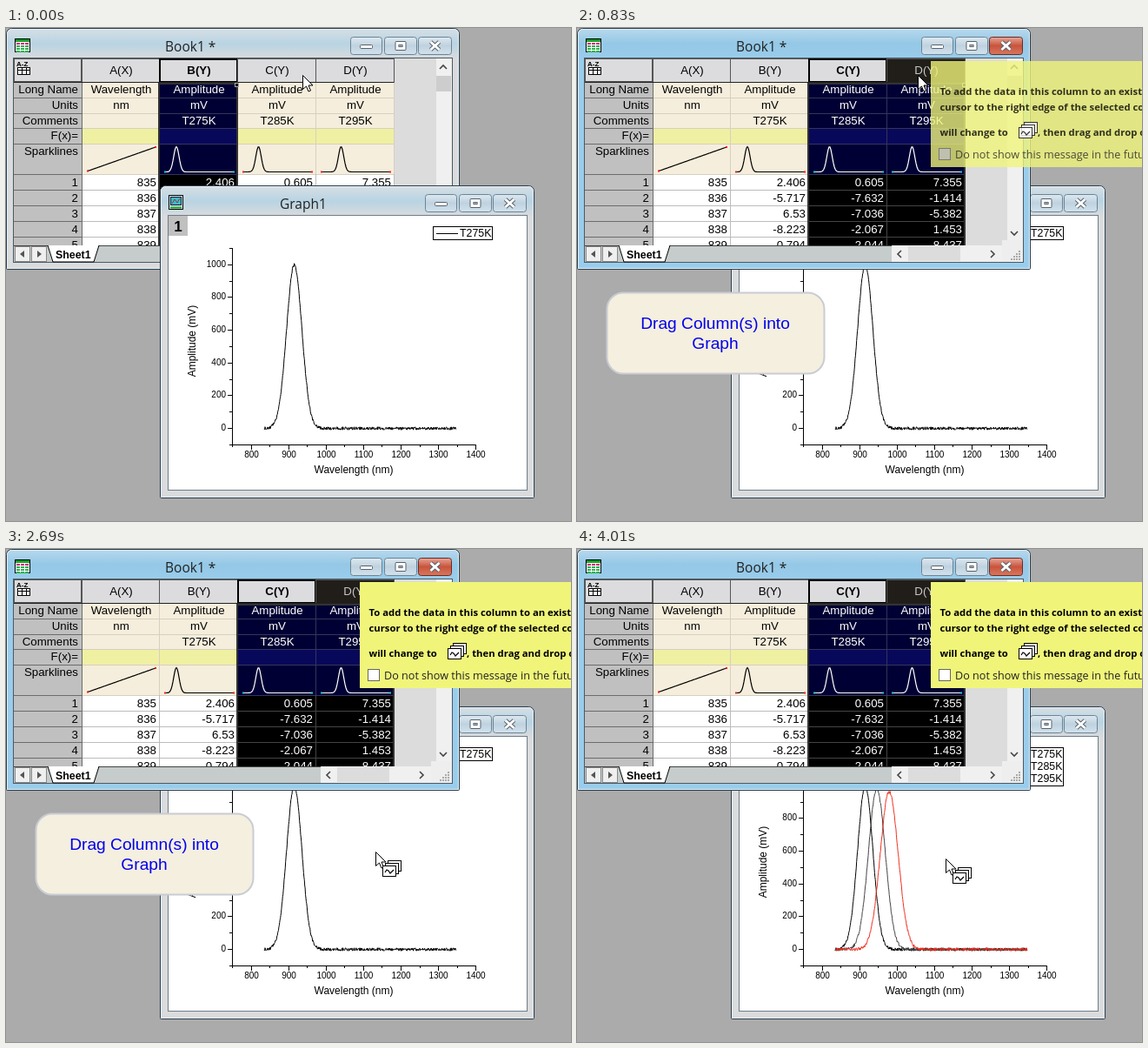
Write an HTML page with a canvas that moves like this. It is 650 by 567 pixels and loops after 4110 ms.

```html
<!DOCTYPE html>
<html lang="en">
<head>
<meta charset="utf-8">
<title>Drag columns into a graph</title>
<style>
html, body { margin: 0; width: 100%; height: 100%; overflow: hidden; background: #ababab; }
canvas { display: block; }
</style>
</head>
<body>
<canvas id="stage" width="650" height="567"></canvas>
<script>
const c = document.getElementById('stage').getContext('2d');
const LOOP = 4110;
const ARIAL = '"Liberation Sans", Arial, sans-serif';
const UI = '"Open Sans", "Noto Sans", sans-serif';

const colX = [87, 176, 266, 356, 446];
const rowY = [62, 80, 98, 115, 133, 168, 186, 204, 222, 240, 258];
const rowNames = ['Long Name', 'Units', 'Comments', 'F(x)=', 'Sparklines', 1, 2, 3, 4, 5];
const columns = [
  { head: 'A(X)', labels: ['Wavelength', 'nm', ''], data: [835, 836, 837, 838, 839] },
  { head: 'B(Y)', labels: ['Amplitude', 'mV', 'T275K'], data: [2.406, -5.717, 6.53, -8.223, 0.794], peak: 196 },
  { head: 'C(Y)', labels: ['Amplitude', 'mV', 'T285K'], data: [0.605, -7.632, -7.036, -2.067, -2.044], peak: 290.5 },
  { head: 'D(Y)', labels: ['Amplitude', 'mV', 'T295K'], data: [7.355, -1.414, -5.382, 1.453, 8.437], peak: 385.5 },
];
const series = [
  { name: 'T275K', color: '#000', center: 915, height: 998, sigma: 20.5 },
  { name: 'T285K', color: '#444', center: 946, height: 980, sigma: 22.5 },
  { name: 'T295K', color: '#f03020', center: 979, height: 962, sigma: 24 },
];

const clamp = v => Math.max(0, Math.min(1, v));
const plotX = nm => 260.5 + (nm - 750) * 0.431;
const plotY = mv => 460.5 - mv * 0.1883;

function rect(x, y, w, h, fill, stroke) {
  if (fill) { c.fillStyle = fill; c.fillRect(x, y, w, h); }
  if (stroke) { c.strokeStyle = stroke; c.lineWidth = 1; c.strokeRect(x + .5, y + .5, w - 1, h - 1); }
}

function round(x, y, w, h, r, fill, stroke, width = 1) {
  c.beginPath();
  c.roundRect(x, y, w, h, r);
  c.fillStyle = fill;
  c.fill();
  c.strokeStyle = stroke;
  c.lineWidth = width;
  c.stroke();
}

function line(points, color, width = 1) {
  c.beginPath();
  points.forEach(([x, y]) => c.lineTo(x, y));
  c.strokeStyle = color;
  c.lineWidth = width;
  c.stroke();
}

function text(s, x, y, font, color = '#000', align = 'left') {
  c.font = font;
  c.fillStyle = color;
  c.textAlign = align;
  c.fillText(s, x, y);
}

function clipped(x, y, w, h, draw) {
  c.save();
  c.beginPath();
  c.rect(x, y, w, h);
  c.clip();
  draw();
  c.restore();
}

function makeCurve({ center, height, sigma }, seed) {
  const random = () => (seed = seed * 16807 % 2147483647) / 2147483647;
  const path = new Path2D();
  for (let nm = 835; nm <= 1347; nm++) {
    const mv = height * Math.exp(-(((nm - center) / sigma) ** 2) / 2) + (random() - .5) * 19;
    path.lineTo(plotX(nm), plotY(mv));
  }
  return path;
}
series.forEach((s, i) => s.path = makeCurve(s, 4321 + i * 977));

function frame(x, y, w, h, title, titleX, active) {
  const fill = c.createLinearGradient(0, y, 0, y + 36);
  const stops = active ? ['#b9d9ed', '#94c8e6', '#9acdec'] : ['#d8dfe4', '#b8d4e3', '#dadbdc'];
  stops.forEach((color, i) => fill.addColorStop(i / 2, color));
  round(x + .5, y + .5, w - 1, h - 1, [6, 6, 1, 1], fill, '#2c3d49');
  round(x + 1.5, y + 1.5, w - 3, h - 3, [5, 5, 0, 0], 'transparent', '#e4f0f8');
  text(title, titleX, y + 27, '15.5px ' + UI, '#222');

  const right = x + w;
  [[-126, 37], [-87, 38], [-48, 39]].forEach(([dx, bw], i) => {
    const bx = right + dx, by = y + 10, red = active && i === 2;
    const face = c.createLinearGradient(0, by, 0, by + 21);
    face.addColorStop(0, red ? '#e7aa9c' : '#dfeaf2');
    face.addColorStop(.5, red ? '#c9543c' : '#bfd2df');
    face.addColorStop(1, red ? '#d97a60' : '#d3e3ee');
    round(bx + .5, by + .5, bw - 1, 20, 3, face, red ? '#6b2a20' : '#6d8494');
    const mx = bx + bw / 2, my = by + 10.5;
    if (i === 0) round(mx - 7, my - 1, 14, 4, 1, '#fff', '#56616b');
    if (i === 1) {
      round(mx - 6, my - 5, 12, 10, 1, '#fff', '#56616b');
      rect(mx - 2.5, my - 1.5, 5, 3, '#a9bdcb', '#56616b');
    }
    if (i === 2) [['#56616b', 5], ['#fff', 3]].forEach(([color, width]) => {
      line([[mx - 5, my - 4.5], [mx + 5, my + 4.5]], color, width);
      line([[mx + 5, my - 4.5], [mx - 5, my + 4.5]], color, width);
    });
  });
}

function sparkline(i, selected) {
  const left = colX[i] + 7, right = colX[i + 1] - 4, { peak } = columns[i];
  const points = [];
  for (let x = left; x <= right; x++)
    points.push([x, peak ? 165.5 - 29 * Math.exp(-(((x - peak) / 3.1) ** 2) / 2)
                         : 164.5 - 27.5 * (x - left) / (right - left)]);
  line(points, selected ? '#fff' : '#000', 1.2);
  const end = points[points.length - 1];
  rect(left - 1, points[0][1] - 1, 2, 2, selected ? '#2cc' : '#e22');
  rect(end[0] - 1, end[1] - 1, 2, 2, selected ? '#2cc' : '#e22');
}

function cells(t) {
  const font = '13.3px ' + ARIAL;
  const lead = t < 30 ? 1 : 2;
  const last = t >= 30 && tipAt(t)[0] >= colX[3] ? 3 : lead;

  rect(9, 35, 78, 27, '#dcdcde', '#555');
  text('A-Z', 12, 44, 'bold 8px ' + ARIAL);
  rect(13, 45, 15, 9, '#fff', '#000');
  line([[13, 48.5], [28, 48.5]], '#000');
  line([[18.5, 45], [18.5, 54]], '#000');
  line([[23.5, 45], [23.5, 54]], '#000');

  rowNames.forEach((name, r) => {
    const y = rowY[r], h = rowY[r + 1] - y;
    rect(9, y + 1, 79, h, '#c0c0c0');
    line([[9, y + h + .5], [87.5, y + h + .5], [87.5, y]], '#6c6c6c');
    text(name, 83, y + (r > 4 ? 14 : 13), font, '#000', 'right');
  });

  columns.forEach((col, i) => {
    const x = colX[i], w = colX[i + 1] - x, middle = x + w / 2 + 1;
    const selected = i >= lead && i <= last, ink = selected ? '#fff' : '#000';
    rowNames.forEach((name, r) => {
      const y = rowY[r], h = rowY[r + 1] - y;
      const fill = r > 4 ? (selected ? '#000' : '#fff')
        : r === 3 ? (selected ? '#08085a' : '#f0f0a2')
        : selected ? '#000034' : '#f6eedc';
      rect(x + 1, y + 1, w, h, fill);
      const grid = selected ? (r > 4 ? '#444' : '#34345c') : (r > 4 ? '#bcbcbc' : '#d6d0c2');
      line([[x + 1, y + h + .5], [x + w + .5, y + h + .5], [x + w + .5, y]], grid);
      if (r < 3) text(col.labels[r], middle, y + 13, font, ink, 'center');
      if (r > 4) text(col.data[r - 5], x + w - 3, y + 14, font, ink, 'right');
    });
    sparkline(i, selected);

    const dark = selected && i !== lead;
    rect(x, 35, w + 1, 28, dark ? '#211e19' : '#dcdcde', '#555');
    if (selected && !dark) {
      c.strokeStyle = '#000';
      c.lineWidth = 2;
      c.strokeRect(x + 1, 36, w - 1, 26);
    }
    text(col.head, middle, 53, (selected && !dark ? 'bold ' : '') + font, dark ? '#c8c8c8' : '#000', 'center');
  });

  line([[9, 62.5], [446, 62.5]], '#222');
  const end = colX[last + 1];
  line([[colX[lead], 250], [colX[lead], 64], [end, 64], [end, 250]], '#333', 2);
  rect(end - 3, 63, 5, 5, '#000', '#aaa');
}

function chevron(x, y, dx, dy) {
  line([[x - dx * 2 - dy * 4, y - dy * 2 - dx * 4], [x + dx * 2, y + dy * 2],
        [x - dx * 2 + dy * 4, y - dy * 2 + dx * 4]], '#444', 1.6);
}

function book(t) {
  frame(0, 0, 522, 278, 'Book1 *', 183, t >= 30);
  rect(10, 12, 18, 16, '#fff', '#000');
  rect(11, 13, 16, 3, '#18a028');
  for (let y = 17; y < 27; y += 3) rect(12, y, 14, 2, y < 19 ? '#d02080' : '#30b050');
  line([[16.5, 16], [16.5, 27]], '#fff');
  line([[21.5, 16], [21.5, 27]], '#fff');

  rect(8, 34, 506, 236, '#dcdcdc', '#4c5a64');
  clipped(9, 35, 438, 215, () => cells(t));

  rect(495, 35, 18, 209, '#f0f0f0');
  rect(495, 55, 17, 18, '#cdcdcd');
  chevron(503, 45, 0, -1);
  chevron(503, 236, 0, 1);

  rect(9, 250, 504, 19, '#c6cccc');
  line([[9, 250.5], [362, 250.5]], '#444');
  [10, 29].forEach((x, i) => {
    rect(x, 251, 18, 18, '#efefef', '#8a8a8a');
    const d = i ? 1 : -1;
    c.beginPath();
    c.moveTo(x + 9 + d * 3, 260);
    c.lineTo(x + 9 - d * 2, 256);
    c.lineTo(x + 9 - d * 2, 264);
    c.fillStyle = '#555';
    c.fill();
  });
  c.beginPath();
  [[48, 250], [54, 269], [101, 269], [107, 250]].forEach(p => c.lineTo(...p));
  c.fillStyle = '#fff';
  c.fill();
  c.strokeStyle = '#000';
  c.lineWidth = 1;
  c.stroke();
  text('Sheet1', 57, 265, 'bold 12.4px ' + ARIAL);

  rect(362, 250, 127, 19, '#f0f0f0');
  rect(381, 251, 60, 17, '#dcdcdc');
  chevron(371, 260, -1, 0);
  chevron(478, 260, 1, 0);
  rect(489, 244, 24, 25, '#eee');
  for (let a = 0; a < 4; a++)
    for (let b = 0; b <= a; b++) rect(508 - b * 3, 256 + a * 3, 2, 2, '#aaa');
}

function graph(merged) {
  frame(177, 181, 431, 360, 'Graph1', 315, false);
  rect(187, 192, 17, 17, '#dde6ea', '#000');
  rect(189, 194, 13, 10, '#30c0d0', '#123');
  line([[191, 202], [194, 197], [197, 201], [200, 196]], '#d02020');
  line([[189, 206.5], [202, 206.5]], '#18a028', 2);

  rect(186, 215, 414, 317, '#fff', '#6f7d88');
  rect(187, 216, 22, 23, '#c0c0c0');
  text('1', 198, 234, 'bold 17px ' + ARIAL, '#000', 'center');

  const small = '10px ' + ARIAL, label = '12px ' + ARIAL;
  line([[260.5, 253], [260.5, 479.5], [540, 479.5]], '#000');
  for (let nm = 750; nm <= 1400; nm += 50) {
    const x = Math.floor(plotX(nm)) + .5, major = nm % 100 === 0;
    line([[x, 479], [x, major ? 485 : 482]], '#000');
    if (major) text(nm, x, 494, small, '#000', 'center');
  }
  for (let mv = -100; mv <= 1100; mv += 100) {
    const y = Math.floor(plotY(mv)) + .5, major = mv % 200 === 0;
    line([[260, y], [major ? 255 : 257, y]], '#000');
    if (major) text(mv, 253, Math.floor(y) + 3, small, '#000', 'right');
  }
  text('Wavelength (nm)', 400, 512, label, '#000', 'center');
  c.save();
  c.translate(218, 360);
  c.rotate(-Math.PI / 2);
  text('Amplitude (mV)', 0, 0, label, '#000', 'center');
  c.restore();

  const shown = merged ? series : series.slice(0, 1);
  rect(491, 228, 69, merged ? 45 : 16, '#fff', '#000');
  shown.forEach((s, i) => {
    c.strokeStyle = s.color;
    c.lineWidth = 1;
    c.stroke(s.path);
    line([[495, 236.5 + i * 14], [520, 236.5 + i * 14]], s.color);
    text(s.name, 522, 240 + i * 14, '12.4px ' + ARIAL);
  });
}

function caption(alpha) {
  // The panel is a deeper tan while it is still translucent.
  const tint = [[220, 245], [200, 239], [172, 223]].map(([from, to]) => from + (to - from) * alpha);
  c.globalAlpha = alpha;
  round(34.5, 304.5, 250, 93, 19, `rgb(${tint})`, '#c9ccd2', 2);
  text('Drag Column(s) into', 159, 346, '19.2px ' + ARIAL, '#0000ee', 'center');
  text('Graph', 159, 369, '19.2px ' + ARIAL, '#0000ee', 'center');
  c.globalAlpha = 1;
}

function stack(x, y) {
  for (let i = 2; i >= 0; i--) rect(x + i * 3, y + 6 - i * 3, 16, 13, '#fff', '#000');
  line([[x + 3, y + 14], [x + 5, y + 11], [x + 7, y + 12], [x + 9, y + 15], [x + 13, y + 11]], '#000', 1.2);
}

function hint(alpha, t) {
  const bold = 'bold 11.3px ' + UI;
  c.globalAlpha = alpha;
  rect(407, 38, 243, 122, '#f0f57a');
  text('To add the data in this column to an existing graph', 417.5, 77, bold);
  text('cursor to the right edge of the selected column', 417.5, 95, bold);
  text('will change to', 417.5, 124, bold);
  stack(508, 108);
  text(', then drag and drop on', 530, 124, bold);
  rect(416, 138, 14, 14, t < 1100 ? '#c0c0c0' : '#fff', '#666');
  text('Do not show this message in the future', 435, 150, '12.6px ' + UI, '#222');
  c.globalAlpha = 1;
}

const easeOut = u => 1 - (1 - u) ** 3;
const easeInOut = u => u < .5 ? 4 * u ** 3 : 1 - 4 * (1 - u) ** 3;

// pointer moves: start, end, target x, target y, easing
const home = [341, 54];
const moves = [
  [30, 640, 392, 54, easeInOut],
  [850, 1590, 438, 186, easeOut],
  [1620, 1710, 440, 186, easeInOut],
  [2180, 2840, 424, 356, easeInOut],
];

function tipAt(t) {
  let [x, y] = home;
  for (const [from, to, tx, ty, ease] of moves) {
    const k = ease(clamp((t - from) / (to - from)));
    x += (tx - x) * k;
    y += (ty - y) * k;
  }
  return [Math.round(x), Math.round(y)];
}

function pointer(t) {
  const [x, y] = tipAt(t);
  if (t >= 2200 && y < 278) {
    [['#fff', 4.5], ['#111', 2]].forEach(([color, width]) => {
      c.beginPath();
      c.arc(x + 1, y + 4.5, 6.3, 0, Math.PI * 2);
      c.strokeStyle = color;
      c.lineWidth = width;
      c.stroke();
      line([[x - 3.5, y], [x + 5.5, y + 9]], color, width);
    });
    return;
  }
  c.beginPath();
  [[0, 0], [0, 16], [4, 12.5], [6.5, 18.5], [9, 17.5], [6.5, 11.5], [11.5, 11.5]]
    .forEach(([dx, dy]) => c.lineTo(x + .5 + dx, y + .5 + dy));
  c.closePath();
  c.fillStyle = '#fff';
  c.fill();
  c.strokeStyle = '#000';
  c.lineWidth = 1;
  c.stroke();
  if (t >= 1240) stack(x + 8, y + 10);
}

function draw(t) {
  rect(0, 0, 650, 567, '#ababab');
  const merged = t >= 3400;
  if (t < 30) {
    book(t);
    graph(merged);
  } else {
    graph(merged);
    book(t);
  }
  const fadeIn = 1 - (1 - clamp((t - 10) / 780)) ** 2;
  const fadeOut = 1 - clamp((t - 3120) / 890);
  if (t >= 30) caption(fadeIn * fadeOut);
  hint(clamp((t - 420) / 520), t);
  pointer(t);
}

const start = performance.now();
function tick() {
  draw((performance.now() - start) % LOOP);
  requestAnimationFrame(tick);
}
tick();
</script>
</body>
</html>
```
